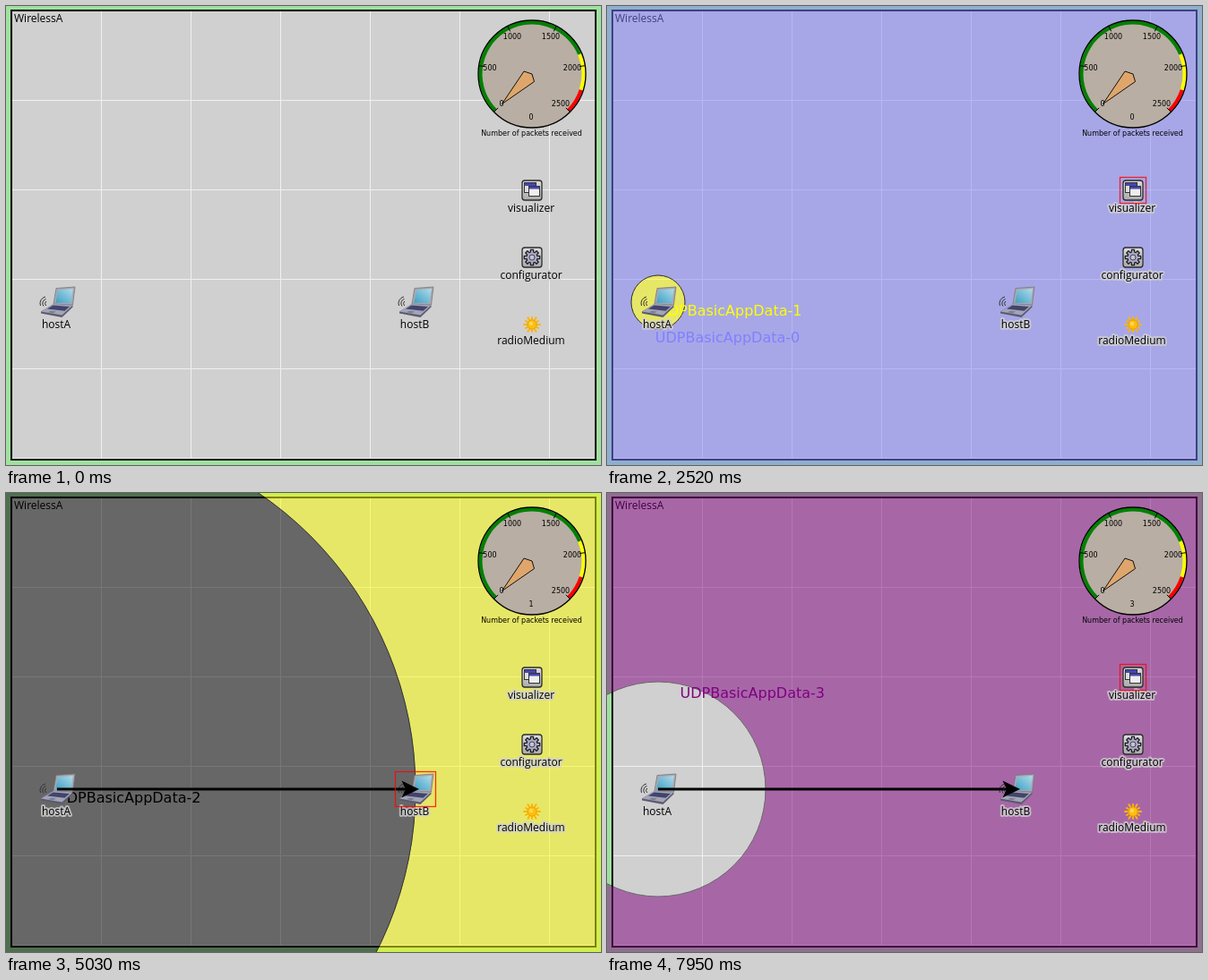
Write an HTML page that moves like this. It is 664x513 px and loops after 8 s.

```html
<!DOCTYPE html>
<html lang="en">
<head>
<meta charset="utf-8">
<title>Wireless signal propagation</title>
<style>
  html, body { margin: 0; width: 100%; height: 100%; overflow: hidden; background: #a0e0a0; }
  svg { display: block; width: 664px; height: 513px; }
  .name { font: 12px "Open Sans", "Noto Sans", sans-serif; }
  .halo { text-anchor: middle; paint-order: stroke; stroke: #d0d0d0; stroke-opacity: .75; stroke-width: 4; stroke-linejoin: round; }
  .small { font: 8px "DejaVu Sans", sans-serif; text-anchor: middle; }
  .packet { font: 16px "DejaVu Sans", sans-serif; }
</style>
</head>
<body>
<svg viewBox="0 0 664 513">
  <defs>
    <linearGradient id="glass" x1="0" y1="1" x2="1" y2="0">
      <stop offset="0" stop-color="#3f9fc0"/><stop offset=".55" stop-color="#7cc0da"/><stop offset="1" stop-color="#b4dcea"/>
    </linearGradient>
    <linearGradient id="tile" x1="0" y1="0" x2="0" y2="1">
      <stop offset="0" stop-color="#dcdcdc"/><stop offset="1" stop-color="#ababab"/>
    </linearGradient>
    <g id="laptop">
      <path d="M-1 -15.5L20 -17L17.5 3L-4 2Z" fill="#a9a9b0" stroke="#77777f" stroke-width=".8"/>
      <path d="M1 -13.5L17.8 -15L15.6 1L-1.8 .8Z" fill="url(#glass)"/>
      <path d="M-4 2L17.5 3.5L17.5 5.5L5.5 17L-18 12.5L-18 10.5Z" fill="#5b5b70"/>
      <path d="M-4 2L17.5 3.5L5.5 14.5L-18 10.5Z" fill="#a4a4b8"/>
      <path d="M-4.5 3.5L14 5L8.5 9.8L-11 7.5Z" fill="#41456c"/>
      <path d="M-7 9.8L-1 10.6L-4 12.3L-10 11.2Z" fill="#7d7d92"/>
      <path d="M-11 4A3 3 0 0 1 -11 -1M-14 4.5A5 5 0 0 1 -11.5 -3.5M-17.5 4A7.5 7.5 0 0 1 -12 -6" transform="translate(-1 0)" fill="none" stroke="#333"/>
    </g>
    <rect id="plate" x="-11" y="-11" width="22" height="22" rx="3" fill="url(#tile)" stroke="#2c2c2c" stroke-width="1.3"/>
  </defs>

  <rect width="664" height="513" fill="#a0e0a0"/>
  <rect x="6" y="5" width="652" height="502" fill="#d0d0d0"/>
  <path id="grid" stroke="#f0f0f0" fill="none"/>
  <rect x="6" y="5" width="652" height="502" fill="none" stroke="#000" stroke-width="2"/>
  <text class="name" x="9" y="18">WirelessA</text>

  <g id="signals"></g>

  <g id="gauge">
    <circle cx="587" cy="76" r="60" fill="#b8aea3"/>
    <g id="bands" fill="none" stroke-width="4"></g>
    <circle cx="587" cy="76" r="60" fill="none" stroke="#000" stroke-width="1.3"/>
    <path d="M553.5 109.5L578 73L587 76L589.5 84.5Z" fill="#dfa66c" stroke="#000" stroke-width=".9"/>
    <text id="count" class="small" x="586" y="127"></text>
    <text class="small" x="586.5" y="145">Number of packets received</text>
  </g>

  <use href="#laptop" x="57" y="331"/>
  <use href="#laptop" x="457" y="331"/>
  <g transform="translate(587 206)">
    <use href="#plate"/>
    <rect x="-8.5" y="-8.5" width="13" height="11" fill="#ddd" stroke="#333"/>
    <rect x="-8" y="-8" width="12" height="3" fill="#4646b4"/>
    <rect x="-3.5" y="-4.5" width="12" height="11" fill="#eee" stroke="#333"/>
    <rect x="-3" y="-4" width="11" height="2.5" fill="#4646b4"/>
  </g>
  <g transform="translate(587 281)">
    <use href="#plate"/>
    <path id="gear" fill="#a9a9c4" stroke="#1c1c24" stroke-width="1.3" stroke-linejoin="round"/>
    <circle r="3" fill="#c4c4cc" stroke="#44445a"/>
  </g>
  <g transform="translate(587 356)">
    <path id="rays" stroke="#ffb400" stroke-width="2" stroke-linecap="round"/>
    <circle r="5.2" fill="#ffbe0a" stroke="#e89a00" stroke-width=".8"/>
    <circle cx="-1" cy="-1" r="2.2" fill="#ffd95a"/>
  </g>
  <g id="names"></g>

  <g id="link">
    <path d="M57 331H448" stroke="#000" stroke-width="3"/>
    <path d="M461 331L441.5 321.5L446 331L441.5 340.5Z"/>
  </g>
  <rect id="box" fill="none" stroke="#f00" stroke-opacity=".8" stroke-width="1.3"/>
</svg>
<script>
const LOOP = 8000, FULL = 999, CX = 57, CY = 331;
const $ = id => document.getElementById(id);

function add(parent, tag, attrs, text = '') {
  const el = document.createElementNS('http://www.w3.org/2000/svg', tag);
  for (const k in attrs) el.setAttribute(k, attrs[k]);
  el.textContent = text;
  parent.appendChild(el);
  return el;
}
function polar(r, deg, x = 0, y = 0) {
  const a = deg * Math.PI / 180;
  return [x + r * Math.cos(a), y + r * Math.sin(a)].map(v => v.toFixed(2)).join(' ');
}

// Static parts
let grid = '';
for (let x = 106.5; x < 658; x += 100) grid += `M${x} 6V506`;
for (let y = 105.5; y < 507; y += 100) grid += `M7 ${y}H657`;
$('grid').setAttribute('d', grid);

[['green', 135, 337.5], ['yellow', 337.5, 378], ['red', 378, 405]].forEach(([stroke, a, b]) =>
  add($('bands'), 'path', {
    stroke, d: `M${polar(57.5, a, 587, 76)}A57.5 57.5 0 ${+(b - a > 180)} 1 ${polar(57.5, b, 587, 76)}`
  }));
[[553, 112], [540, 72], [565, 37], [608, 37], [632, 72], [619, 112]].forEach(([x, y], i) => {
  const a = 135 + 54 * i;
  add($('gauge'), 'path', { stroke: '#000', d: `M${polar(59.5, a, 587, 76)}L${polar(53.5, a, 587, 76)}` });
  add($('gauge'), 'text', { class: 'small', x, y }, i * 500);
});

let gear = '', rays = '';
for (let i = 0; i < 8; i++) {
  [[6.2, -15], [8.8, -10], [8.8, 10], [6.2, 15]].forEach(([r, a]) =>
    gear += (gear ? 'L' : 'M') + polar(r, i * 45 + a));
}
for (let i = 0; i < 12; i++) rays += `M${polar(6, i * 30)}L${polar(i % 2 ? 8 : 9, i * 30)}`;
$('gear').setAttribute('d', gear + 'Z');
$('rays').setAttribute('d', rays);

[['hostA', 56, 360], ['hostB', 456, 360], ['visualizer', 586, 230],
 ['configurator', 586, 305], ['radioMedium', 586, 378]].forEach(([s, x, y]) =>
  add($('names'), 'text', { class: 'name halo', x, y }, s));

// Signals: a ring and a label that rides on its trailing edge
const signals = ['#8080ff', '#ffff00', '#000000', '#800080'].map(fill => ({
  ring: add($('signals'), 'path', { fill, stroke: '#000', opacity: .5, 'fill-rule': 'evenodd' }), fill
}));
signals.forEach((s, i) =>
  s.label = add($('signals'), 'text', { class: 'packet', fill: s.fill }, 'UDPBasicAppData-' + i));

const boxes = {
  A: [34.5, 311.5, 45, 39], B: [434.5, 311.5, 45, 39], V: [572.5, 191.5, 29, 29]
};

// Steps: start time, marked module, newest signal, its front radius
const steps = [[0, '', 0, -1], [210, 'B', 0, -1], [630, 'A', 0, -1]];
function wave(times, id, r0, marks) {
  times.forEach((t, i) => steps.push([t, marks[i], id, r0 + 100 * i]));
}
wave([840, 1050, 1260, 1470], 0, 90, 'VVVB');
steps.push([1680, 'V', 0, FULL], [2100, 'A', 0, FULL]);
wave([2520, 2730, 2940, 3150, 3350], 1, 30, 'VVVBV');
steps.push([3560, 'V', 1, FULL], [3770, 'A', 1, FULL]);
wave([4190, 4400, 4610, 4820, 5030], 2, 0, 'VVVVB');
steps.push([5240, 'V', 2, FULL], [6080, 'A', 2, FULL]);
wave([6290, 6500, 6710, 6920, 7120], 3, 0, 'VVVVV');
steps.push([7330, 'V', 3, FULL], [7540, 'A', 3, FULL]);
wave([7750, 7950], 4, 20, 'VV');

const circle = r => r > 0 ? `M${CX - r} ${CY}a${r} ${r} 0 1 0 ${2 * r} 0a${r} ${r} 0 1 0 ${-2 * r} 0Z` : '';
const show = (el, on) => el.setAttribute('visibility', on ? 'visible' : 'hidden');

function draw(time) {
  const [, mark, newest, r] = steps.findLast(s => s[0] <= time);
  signals.forEach(({ ring, label }, id) => {
    const front = id < newest ? FULL : id === newest ? r : -1;
    const tail = id === newest ? 0 : id === newest - 1 ? r : FULL;
    const on = front >= 0 && tail < FULL;
    show(ring, on);
    show(label, on);
    if (!on) return;
    ring.setAttribute('d', circle(front) + circle(tail));
    const phi = id - .073;
    label.setAttribute('x', CX - 1 + tail * Math.sin(phi));
    label.setAttribute('y', CY + 15 + tail * Math.cos(phi));
  });
  const count = time < 3350 ? 0 : time < 5240 ? 1 : time < 7120 ? 2 : 3;
  $('count').textContent = count;
  show($('link'), count > 0);
  show($('box'), mark);
  if (mark) ['x', 'y', 'width', 'height'].forEach((k, i) => $('box').setAttribute(k, boxes[mark][i]));
}

const start = performance.now();
function tick() {
  draw((performance.now() - start) % LOOP);
  requestAnimationFrame(tick);
}
draw(0);
requestAnimationFrame(tick);
</script>
</body>
</html>
```
